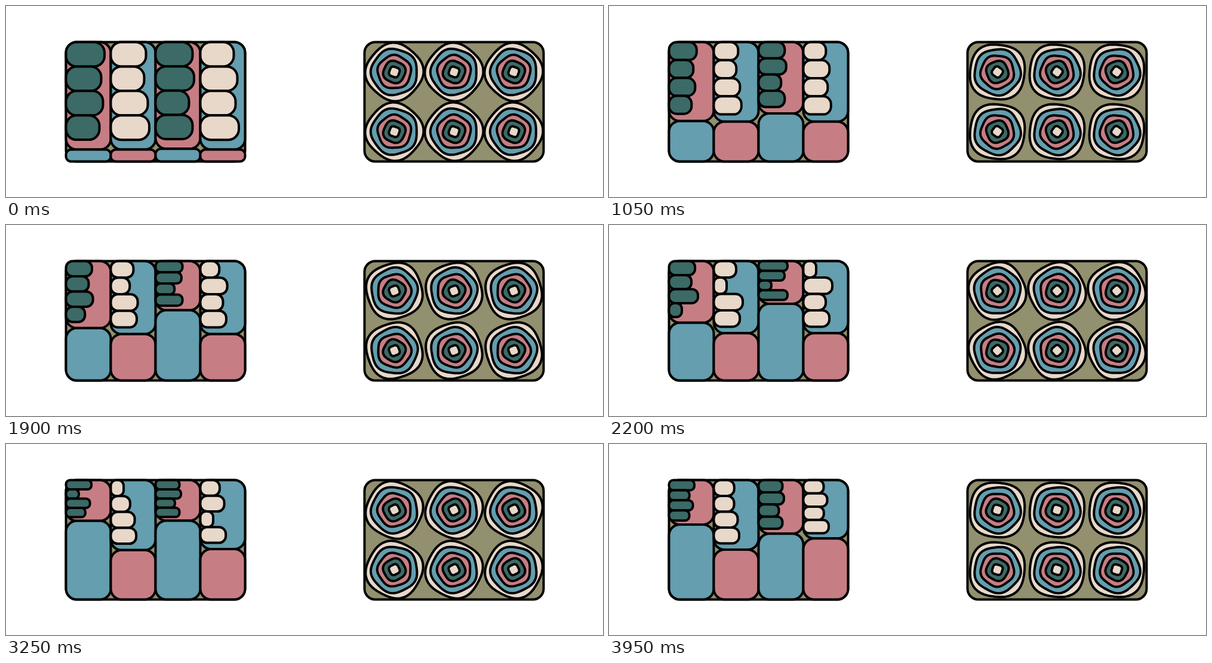
An HTML page with a canvas for the animation above (4000 ms loop, 1000x320 px).

```html
<!DOCTYPE html>
<html lang="en">
<head>
<meta charset="utf-8">
<title>Blocks and rings</title>
<style>
html, body { margin: 0; width: 100%; height: 100%; overflow: hidden; background: #fff; }
canvas { display: block; width: 1000px; height: 320px; }
</style>
</head>
<body>
<canvas id="stage"></canvas>
<script>
const LOOP = 4000, STEP = 75;
const OLIVE = '#92906e', GREEN = '#3c6a66', CREAM = '#e7d8ca', PINK = '#c67e84', BLUE = '#649eaf';

// Each size settles from its opening value, with one swing of its own (seconds)
const settle = (t, rest, extra, tau) => rest + extra * Math.exp(-t / tau);
const swing = (t, { by, at, width }) => by * Math.exp(-(((t - at) / width) ** 2));

const SURGE = { by: 24, at: 2.65, width: .25 };

// Bars named by letter share one length across all columns
const COLUMNS = [
  { by: -50, at: 3.4, width: 1.2, bars: 'ABCD' },
  { by: 0, at: 0, width: 1, bars: 'BDCA' },
  { by: -57, at: 2.7, width: 1.38, bars: 'CADC' },
  { by: -24, at: 4.2, width: .6, bars: 'DCBA' }
];
const BARS = {
  A: { shift: 2.5, by: 4, at: 2.6, width: .3 },
  B: { shift: -3, by: -16, at: 3.3, width: .45 },
  C: { shift: 0, by: 8, at: 2.2, width: .4 },
  D: { shift: -6, by: -22, at: 2.5, width: .45 }
};

// From outside in: radius, corners, depth, first angle and speed in degrees
const RINGS = [
  { fill: CREAM, r: 47.2, corners: 4, depth: .038, angle: -4, speed: -32 },
  { fill: BLUE, r: 38.5, corners: 5, depth: .03, angle: -36, speed: -25 },
  { fill: PINK, r: 27.8, corners: 5, depth: .035, angle: -20, speed: -27 },
  { fill: GREEN, r: 18.4, corners: 4, depth: .05, angle: -20, speed: -45 },
  { fill: CREAM, r: 8.8, corners: 4, depth: .07, angle: -25, speed: -70 }
];

const canvas = document.getElementById('stage');
const ctx = canvas.getContext('2d');
const dpr = window.devicePixelRatio || 1;
canvas.width = 1000 * dpr;
canvas.height = 320 * dpr;

function paint(fill) {
  ctx.fillStyle = fill;
  ctx.fill();
  ctx.stroke();
}

function box(x, y, w, h, fill) {
  ctx.beginPath();
  ctx.roundRect(x, y, w, h, Math.min(18, Math.min(w, h) * .43));
  paint(fill);
}

function barLength(name, t) {
  const bar = BARS[name];
  return settle(t, 40, 22, .6) + bar.shift + swing(t, bar);
}

function column(col, i, t) {
  const x = 100 + i * 75;
  const h = settle(t, 116, 64, .8) + swing(t, SURGE) + swing(t, col);
  const pitch = h / 4.4;
  const [upper, lower, bar] = i % 2 ? [BLUE, PINK, CREAM] : [PINK, BLUE, GREEN];
  box(x, 60, 75, h, upper);
  box(x, 60 + h, 75, 200 - h, lower);
  [...col.bars].forEach((name, row) => {
    box(x, 60 + row * pitch, barLength(name, t), pitch, bar);
  });
}

function ring(cx, cy, { fill, r, corners, depth, angle, speed }, t) {
  const turn = angle + speed * t;
  ctx.beginPath();
  for (let d = 0; d < 360; d += 3) {
    const a = (d + turn) * Math.PI / 180;
    const q = r * (1 + depth * Math.cos(corners * d * Math.PI / 180));
    ctx.lineTo(cx + q * Math.cos(a), cy + q * Math.sin(a));
  }
  ctx.closePath();
  paint(fill);
}

function draw(t) {
  ctx.setTransform(dpr, 0, 0, dpr, 0, 0);
  ctx.fillStyle = '#fff';
  ctx.fillRect(0, 0, 1000, 320);
  ctx.translate(.5, .5);
  ctx.lineWidth = 4;
  ctx.lineJoin = 'round';

  box(100, 60, 300, 200, OLIVE);
  COLUMNS.forEach((col, i) => column(col, i, t));

  box(600, 60, 300, 200, OLIVE);
  for (let y = 110; y < 260; y += 100) {
    for (let x = 650; x < 900; x += 100) {
      RINGS.forEach(shape => ring(x, y, shape, t));
    }
  }
}

const start = performance.now();
function tick() {
  const t = (performance.now() - start) % LOOP;
  draw(Math.floor(t / STEP) * STEP / 1000);
  requestAnimationFrame(tick);
}
tick();
</script>
</body>
</html>
```
